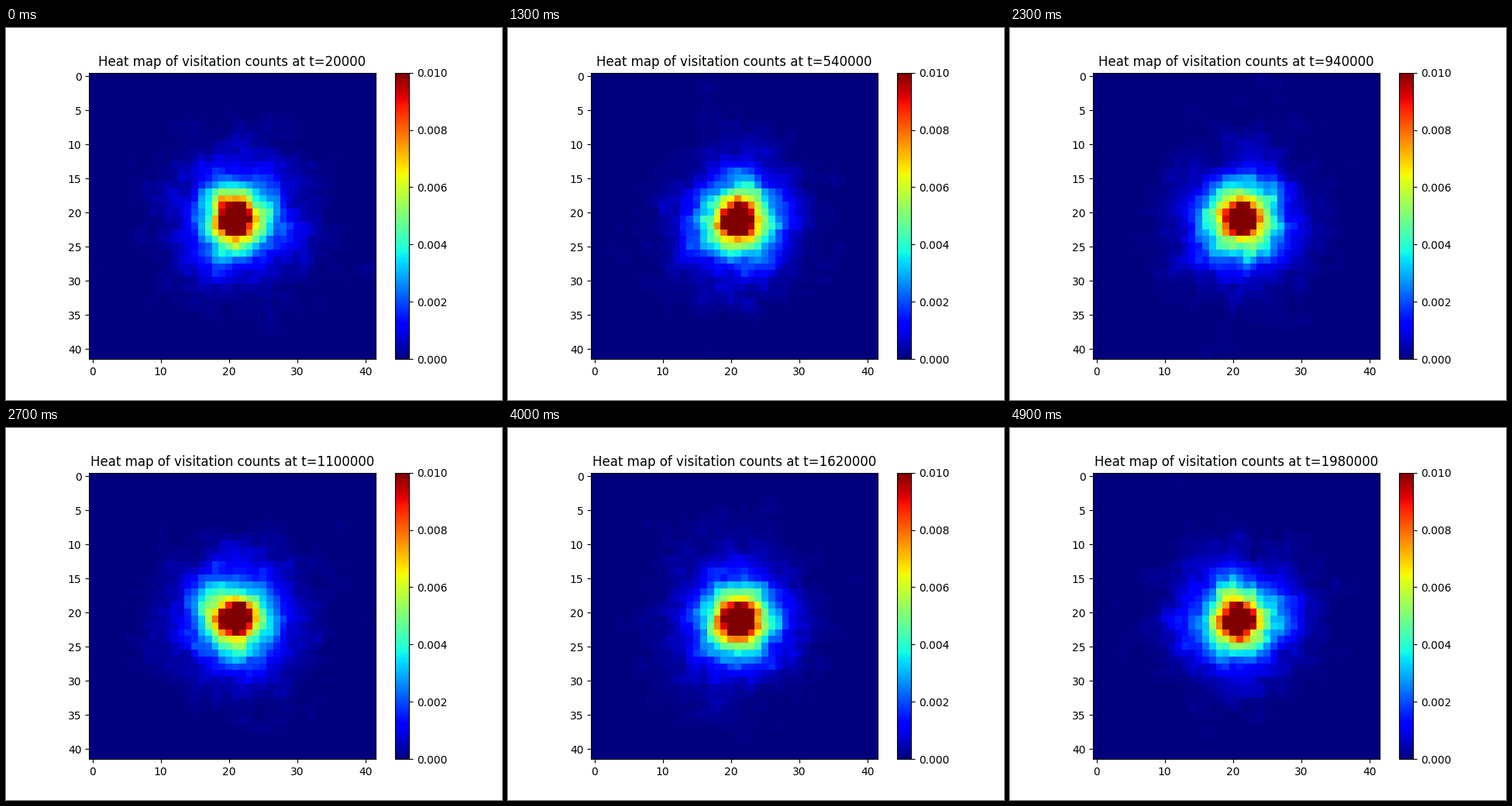
A matplotlib script that plays this animation: 640 px wide and 480 px high, repeating every 5 s.

```python
import numpy as np
import matplotlib.pyplot as plt
from matplotlib.animation import FuncAnimation

SIZE = 42
CENTRE = SIZE // 2
FRAMES = 50
INTERVAL = 100
FIRST_STEP, STEPS_PER_FRAME = 20000, 40000
WALK_LENGTH = 70
WALKS = STEPS_PER_FRAME // WALK_LENGTH
MOVES = np.array([(0, 1), (0, -1), (1, 0), (-1, 0)])
VMAX = 0.01

plt.rcParams["font.family"] = "DejaVu Sans"


def simulate_visits(seed=7):
    """Share of visits per cell for short random walks from the centre."""
    rng = np.random.default_rng(seed)
    total = WALKS * FRAMES
    offset = np.repeat(np.arange(FRAMES), WALKS) * SIZE * SIZE
    pos = np.full((total, 2), CENTRE)
    counts = np.zeros(FRAMES * SIZE * SIZE)
    for _ in range(WALK_LENGTH):
        cell = offset + pos[:, 0] * SIZE + pos[:, 1]
        counts += np.bincount(cell, minlength=counts.size)
        step = MOVES[rng.integers(len(MOVES), size=total)]
        pos = np.clip(pos + step, 0, SIZE - 1)
    return counts.reshape(FRAMES, SIZE, SIZE) / (WALKS * WALK_LENGTH)


heat = simulate_visits()

fig, ax = plt.subplots(figsize=(6.4, 4.8), dpi=100)
image = ax.imshow(heat[0], cmap="jet", vmin=0, vmax=VMAX, interpolation="nearest")
ax.set_xticks(range(0, SIZE, 10))
ax.set_yticks(range(0, SIZE, 5))
fig.colorbar(image, ax=ax, ticks=np.linspace(0, VMAX, 6), format="%.3f")
title = ax.set_title("")


def update(frame):
    image.set_data(heat[frame])
    step = FIRST_STEP + frame * STEPS_PER_FRAME
    title.set_text(f"Heat map of visitation counts at t={step}")
    return image, title


anim = FuncAnimation(
    fig, update, frames=FRAMES, interval=INTERVAL, repeat=True, repeat_delay=0
)
plt.show()
```
